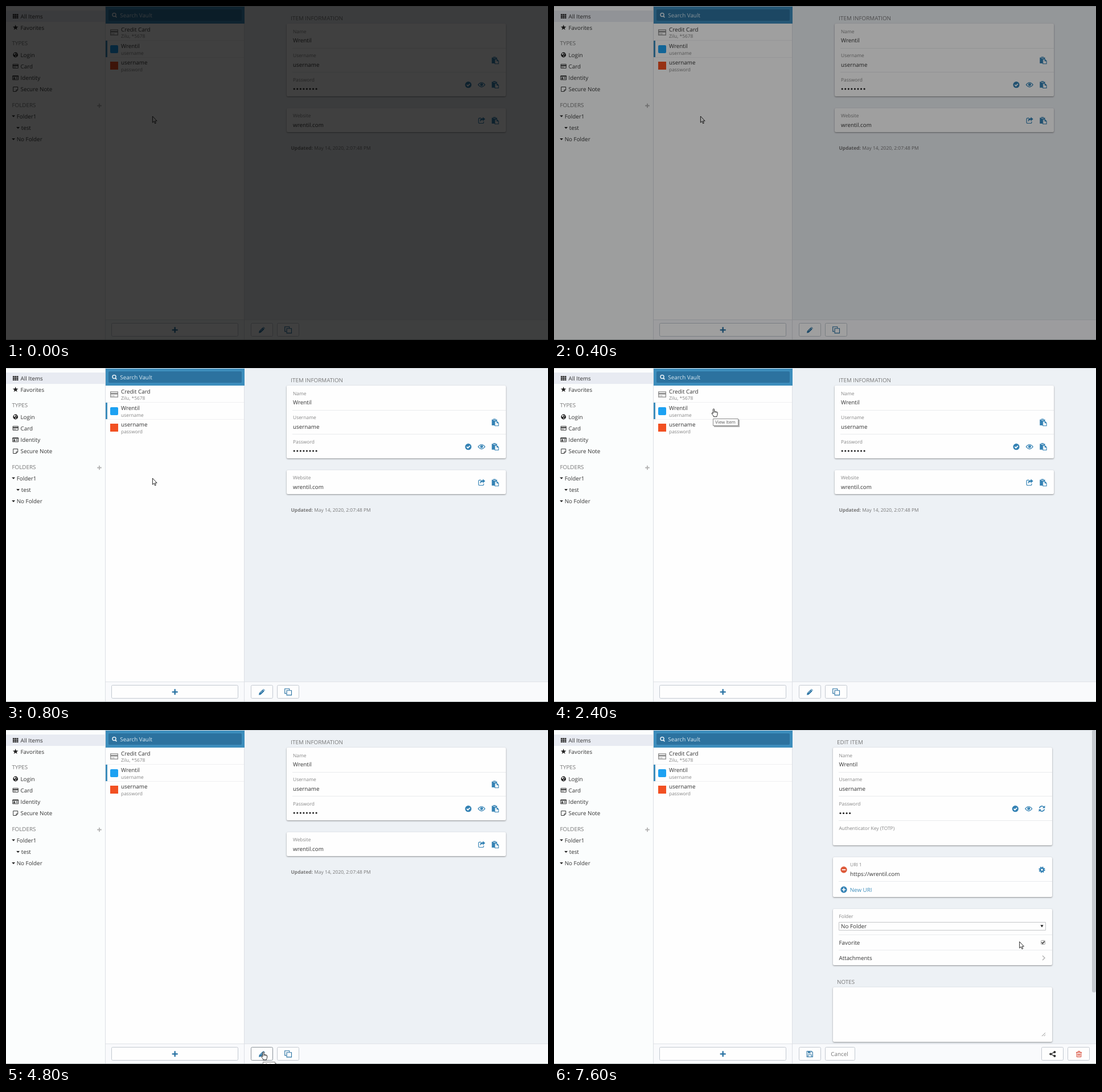
These frames come from a looping animation (952 px wide and 588 px high, 8 s). An HTML page with a canvas:

```html
<!DOCTYPE html>
<html lang="en">
<head>
<meta charset="utf-8">
<title>Vault</title>
<style>
html, body { margin: 0; width: 952px; height: 588px; overflow: hidden; background: #000; }
canvas { display: block; }
</style>
</head>
<body>
<canvas id="stage" width="952" height="588"></canvas>
<script>
const ctx = document.getElementById('stage').getContext('2d');
const LOOP = 8000, STEP = 200;
const BASE = 9.84, SMALL = 8.44;
const BLUE = '#3c8dbc', ICON = '#3482b4', DEEP = '#2872a3', INK = '#333', MUTED = '#777', LABEL = '#858585';
const WHITE = '#fefefe', LINE = '#e9ebed';
const SITE = 'Wrentil', HOST = 'wrentil.com';

// ---------- helpers ----------
function rect(x, y, w, h, color) {
  ctx.fillStyle = color;
  ctx.fillRect(x, y, w, h);
}

function box(x, y, w, h, r, fill, stroke) {
  ctx.beginPath();
  ctx.roundRect(x, y, w, h, r);
  if (fill) { ctx.fillStyle = fill; ctx.fill(); }
  if (stroke) { ctx.strokeStyle = stroke; ctx.lineWidth = 1; ctx.stroke(); }
}

// y is the middle of the capitals
function text(s, x, y, size = BASE, color = INK, weight = 400) {
  ctx.font = `${weight} ${size}px "Open Sans", sans-serif`;
  ctx.fillStyle = color;
  ctx.fillText(s, x, y + size * 0.357);
  return ctx.measureText(s).width;
}

function at(x, y, draw) {
  ctx.save();
  ctx.translate(x, y);
  draw();
  ctx.restore();
}

function fill(d, color) {
  ctx.fillStyle = color;
  ctx.fill(new Path2D(d), 'evenodd');
}

function line(d, color, width = 1) {
  ctx.strokeStyle = color;
  ctx.lineWidth = width;
  ctx.stroke(new Path2D(d));
}

function disc(x, y, r, color) {
  ctx.beginPath();
  ctx.arc(x, y, r, 0, 7);
  ctx.fillStyle = color;
  ctx.fill();
}

function card(y, h, x, rows) {
  ctx.save();
  ctx.shadowColor = 'rgba(0,0,0,.42)';
  ctx.shadowBlur = 2.5;
  ctx.shadowOffsetY = 1;
  box(x, y, 385, h, 2, WHITE);
  ctx.restore();
  for (const r of rows) rect(x + 10, r, 375, 1, LINE);
}

function button(x, w, hot) {
  box(x + 0.5, 558.5, w - 1, 23, 2, WHITE, hot ? '#8b9299' : '#c3c9d1');
}

function dots(x, y, n) {
  for (let i = 0; i < n; i++) disc(x + i * 5.56, y, 1.6, '#222');
}

// ---------- icons, centred on the origin ----------
const icons = {
  grid() {
    for (let i = 0; i < 9; i++) rect(-4.8 + (i % 3) * 3.4, -3.9 + Math.floor(i / 3) * 2.8, 2.8, 2.2, '#222');
  },
  star() {
    ctx.beginPath();
    for (let i = 0; i < 10; i++) {
      const a = -Math.PI / 2 + i * Math.PI / 5, r = i % 2 ? 2.1 : 5;
      ctx.lineTo(r * Math.cos(a), r * Math.sin(a));
    }
    ctx.fillStyle = '#222';
    ctx.fill();
  },
  globe() {
    disc(0, 0, 4.4, '#222');
    fill('M-2.8-2.4L-.6-3.2 .4-1.8-.8-.8-1.2 .6-2.6-.4ZM1.2-2.6L2.8-1.4 2-.4.8-1ZM-.2 1L1.6 1.4.6 3.2-.4 2.6Z', WHITE);
  },
  creditCard(color = '#222', k = 1) {
    ctx.scale(k, k);
    line('M-4.6-3.4H4.6V3.4H-4.6Z', color, 0.9);
    rect(-4.6, -1.8, 9.2, 1.8, color);
    rect(-3.5, 1.5, 1.4, 0.7, color);
    rect(-1.6, 1.5, 2, 0.7, color);
  },
  idCard() {
    line('M-5-3.4H5V3.4H-5Z', '#222', 0.9);
    rect(-5, -3.8, 10, 1.6, '#222');
    disc(-2.2, -0.4, 1.1, '#222');
    rect(-3.8, 0.8, 3.2, 1.6, '#222');
    rect(0.6, -1, 3.2, 0.8, '#222');
    rect(0.6, 0.9, 3.2, 0.8, '#222');
  },
  note() { line('M-4-4H4V1.2L1.2 4H-4ZM4 1.2H1.2V4', '#222', 0.9); },
  caret() { fill('M-2.9-1.4H2.9L0 1.7Z', '#222'); },
  search() {
    line('M3-.6A3 3 0 1 1-3-.6 3 3 0 1 1 3-.6', '#e6f0f6', 1.5);
    line('M1.6 1.4L4.4 4.2', '#e6f0f6', 1.8);
  },
  plus(color = DEEP, r = 5, w = 2.3) { line(`M${-r} 0H${r}M0 ${-r}V${r}`, color, w); },
  pencil() {
    fill('M-5.2 5.2L-4.6 1.8 1.6-4.4 4.4-1.6-1.8 4.6ZM2.2-5L3-5.6 5.6-3 5-2.2Z', DEEP);
    line('M-2.4 1.8L1.8-2.4', WHITE, 0.7);
  },
  clone() {
    line('M2-3.2V-5.5H-6V2.6H-3.2', DEEP, 1.1);
    line('M-2.6-2.6H5.8V5.6H-2.6Z', DEEP, 1.1);
  },
  paste() {
    fill('M-6-5.2H-3.6V-6.4H.8V-5.2H3.2V5H-6Z', ICON);
    rect(-3.4, -4.8, 4, 0.9, WHITE);
    fill('M-1.2-2.6H3.4L6.4.4V6.4H-1.2Z', WHITE);
    line('M-.6-2H3L5.8.8V5.8H-.6ZM3-2V.8H5.8', ICON, 1.1);
  },
  check() {
    disc(0, 0, 5.6, ICON);
    line('M-2.7 0L-.7 2 2.8-1.6', WHITE, 1.7);
  },
  eye() {
    line('M-6 0Q0-7.8 6 0Q0 7.8-6 0Z', ICON, 1.1);
    disc(0, -0.5, 2.5, ICON);
    line('M-1.3-.6Q-1.2-1.8 0-1.9', WHITE, 0.6);
  },
  share() {
    line('M-.8-4.2H-3.6Q-5.2-4.2-5.2-2.6V3.4Q-5.2 5-3.6 5H2Q3.6 5 3.6 3.4V2', ICON, 1.2);
    fill('M2.2-6L6.4-2.4 2.2 1.2V-.9Q-1.6-1-1.8 2.6Q-4.4-3.6 2.2-3.9Z', ICON);
  },
  refresh() {
    line('M-4.4-1A4.5 4.5 0 0 1 3.4-2.9M4.4 1A4.5 4.5 0 0 1-3.4 2.9', ICON, 1.7);
    fill('M5.4-5.4V-.9H.9ZM-5.4 5.4V.9H-.9Z', ICON);
  },
  round(color, plus) {
    disc(0, 0, 5.7, color);
    line(plus ? 'M-3.2 0H3.2M0-3.2V3.2' : 'M-3.2 0H3.2', WHITE, 1.7);
  },
  cog() {
    line('M3 0A3 3 0 1 1-3 0A3 3 0 1 1 3 0', ICON, 2.5);
    ctx.setLineDash([1.9, 1.71]);
    line('M4.6 0A4.6 4.6 0 1 1-4.6 0A4.6 4.6 0 1 1 4.6 0', ICON, 2);
  },
  save() {
    line('M-5-5H3L5-3V5H-5Z', DEEP, 1.1);
    rect(-3, -5, 5, 3.8, DEEP);
    rect(0, -4.4, 1.2, 2.4, WHITE);
    line('M-3 5V1.2H3V5', DEEP, 1);
  },
  nodes() {
    line('M3.6-3.4L-3.4 0 3.6 3.4', INK, 1.3);
    for (const [x, y] of [[3.6, -3.4], [-3.4, 0], [3.6, 3.4]]) disc(x, y, 2.1, INK);
  },
  trash() {
    line('M-5-3H5M-2-3L-1.4-5H1.4L2-3M-3.8-3V5H3.8V-3M-1.7-1V3.2M0-1V3.2M1.7-1V3.2', '#d6432f', 1);
  }
};

function icon(name, x, y, ...args) {
  at(x, y, () => icons[name](...args));
}

// ---------- panes ----------
function sidebar() {
  rect(0, 0, 174, 588, '#fbfdfd');
  rect(0, 8, 174, 20, '#e8ebf2');
  const nav = [['grid', 'All Items', 18], ['star', 'Favorites', 38], ['globe', 'Login', 86],
    ['creditCard', 'Card', 106], ['idCard', 'Identity', 126.5], ['note', 'Secure Note', 146.5]];
  for (const [name, label, y] of nav) {
    icon(name, 16.7, y);
    text(label, 25.5, y);
  }
  text('TYPES', 10.5, 65.5, BASE, MUTED);
  text('FOLDERS', 10.5, 174, BASE, MUTED);
  icon('plus', 164, 175.5, '#b4b4b4', 3.8, 1.8);
  for (const [label, x, y] of [['Folder1', 18.7, 194], ['test', 26.7, 214.5], ['No Folder', 18.7, 234.5]]) {
    icon('caret', x - 5.6, y);
    text(label, x, y);
  }
  rect(174, 0, 1, 588, '#dcdfe4');
}

function list() {
  rect(175, 0, 243, 588, WHITE);
  rect(175, 1, 244, 30, BLUE);
  box(180, 6, 234, 20, 2, '#2c729f');
  icon('search', 190, 16);
  text('Search Vault', 200.3, 16, BASE, '#dceaf2');

  const rows = [['Credit Card', 'Zilu, *5678'], [SITE, 'username'], ['username', 'password']];
  rows.forEach(([title, sub], i) => {
    const y = 41 + i * 29.3;
    text(title, 202, y);
    text(sub, 202, y + 12.2, SMALL, LABEL);
  });
  rect(175, 60, 243, 1, '#f0f0f2');
  rect(175, 90, 243, 1, '#f0f0f2');
  rect(175, 61, 3, 29, BLUE);
  icon('creditCard', 190, 46.5, '#888', 1.38);
  box(183, 69, 14, 14, 2, '#1da1f2');
  rect(183, 98, 14, 14, '#f25022');

  rect(175, 552, 243, 36, '#f9fafc');
  rect(175, 552, 243, 1, '#e0e3e8');
  button(185, 223);
  icon('plus', 296.7, 570.3);
  rect(418, 31, 1, 557, '#dcdfe4');
}

function mainFooter() {
  rect(419, 552, 533, 36, '#f9fafc');
  rect(419, 552, 533, 1, '#e0e3e8');
}

function viewPane(hot) {
  text('ITEM INFORMATION', 500.3, 21.5, BASE, MUTED);
  card(31, 128, 493, [74, 116]);
  card(180, 42, 493, []);
  const fields = [['Name', SITE, 44.5], ['Username', 'username', 87], ['Password', '', 129.7], ['Website', HOST, 193.3]];
  for (const [label, value, y] of fields) {
    text(label, 504, y, SMALL, LABEL);
    text(value, 504, y + 16.3);
  }
  dots(506.2, 146, 8);
  for (const y of [96, 138.7, 202]) icon('paste', 859.3, y);
  icon('check', 812, 138.7);
  icon('eye', 835.3, 138.7);
  icon('share', 835.3, 201.5);
  const w = text('Updated: ', 500.5, 250, SMALL, MUTED, 700);
  text('May 14, 2020, 2:07:48 PM', 500.5 + w, 250, SMALL, MUTED);

  mainFooter();
  button(430, 39, hot);
  icon('pencil', 449.3, 570.5);
  button(476, 39);
  icon('clone', 495.7, 570.3);
}

function editPane(hot, checked) {
  const x = 500.5;
  text('EDIT ITEM', 497, 21.5, BASE, MUTED);
  card(31, 172, 490, [74, 116, 159]);
  const fields = [['Name', SITE, 44.5], ['Username', 'username', 87], ['Password', '', 129.7], ['Authenticator Key (TOTP)', '', 173]];
  for (const [label, value, y] of fields) {
    text(label, x, y, SMALL, LABEL);
    text(value, x, y + 16.3);
  }
  dots(503, 146.5, 4);
  icon('check', 810.3, 138.7);
  icon('eye', 833.7, 138.7);
  icon('refresh', 857, 138.5);

  card(224, 70, 490, [266]);
  icon('round', 509, 246, '#dd5a3a', false);
  text('URI 1', 520, 237.3, SMALL, LABEL);
  text('https://' + HOST, 520, 253.5);
  icon('cog', 857, 246);
  icon('round', 509, 281, ICON, true);
  text('New URI', 519.7, 281, BASE, BLUE);

  card(315, 99, 490, [360, 387]);
  text('Folder', x, 328, SMALL, LABEL);
  box(500.5, 338.5, 363, 14, 0, WHITE, '#c4c6c8');
  text('No Folder', 504, 345.7);
  at(857, 345.2, () => fill('M-2.6-2H2.6L0 2.4Z', '#222'));
  text('Favorite', x, 374.3);
  box(855.5, 370.5, 7, 7, 1, '#f2f2f2', '#a3a3a3');
  if (checked) at(859, 374, () => line('M-2.4 0L-.7 1.9 2.5-2', '#333', 1.5));
  text('Attachments', x, 401.5);
  at(860, 401.3, () => line('M-2-4L2 0-2 4', '#b5b5b5', 1.5));

  text('NOTES', 497, 443, BASE, MUTED);
  card(453, 96, 490, []);
  at(860, 536, () => line('M-3 3L3-3M.4 3L3 .4', '#777', 0.8));
  box(945, 0, 7, 462, 3, '#c6cacf');

  mainFooter();
  button(430, 39, hot);
  icon('save', 449.3, 570.5);
  button(476, 53);
  text('Cancel', 486.3, 570.3, BASE, MUTED);
  button(856, 39);
  icon('nodes', 875.7, 570.5);
  button(902, 39);
  icon('trash', 922, 570.5);
}

// ---------- pointer ----------
// [first step time, steps, x, y]
const moves = [[1400, 5, 280.5, 71.5], [3200, 6, 452, 566.5], [5600, 6, 758, 358], [6800, 2, 817.3, 372.7]];

function pointerAt(t) {
  let x = 257, y = 194;
  for (const [start, n, tx, ty] of moves) {
    const p = Math.max(0, Math.min(1, ((t - start) / STEP + 1) / n));
    const e = p * p * (3 - 2 * p);
    x += (tx - x) * e;
    y += (ty - y) * e;
  }
  return { x, y };
}

function pointer({ x, y }, hand) {
  const shape = hand
    ? 'M-1.1 1Q0-.6 1.1 1V5Q2.2 4.2 3 5.2Q4.1 4.6 4.8 5.8Q6.2 5.3 6.6 6.9V10Q6.4 12 5.5 13V14.3H-.3V13Q-2 11-3.3 8.6Q-3.3 7.1-2 7.4L-1.1 8.5Z'
    : 'M.4 0V11.2L2.9 8.9 4.7 12.9 6.4 12.1 4.7 8.3H8.1Z';
  at(x, y, () => {
    ctx.lineJoin = 'round';
    fill(shape, '#fff');
    line(shape, '#111', 0.9);
    if (hand) line('M1.1 5V7.4M3 5.4V7.4M4.8 6V7.6', '#111', 0.7);
  });
}

function tooltip(s, x, y, w) {
  rect(x + 2, y + 2, w, 13, 'rgba(0,0,0,.3)');
  box(x + 0.5, y + 0.5, w - 1, 12, 0, '#fff', '#8a8a8a');
  text(s, x + 4, y + 6.4, 7.9, '#5a5a5a');
}

function draw(t) {
  const p = pointerAt(t);
  const onButton = p.x > 430 && p.x < 469 && p.y > 558 && p.y < 582;
  const onList = p.x > 175 && p.x < 418 && p.y > 31 && p.y < 119;

  rect(0, 0, 952, 588, '#edf1f5');
  sidebar();
  list();
  if (t < 5000) viewPane(onButton);
  else editPane(onButton, t >= 7600);
  rect(0, 0, 952, 1, 'rgba(120,130,140,.3)');
  rect(0, 587, 952, 1, '#aeb6b6');

  if (t >= 2400 && t < 3200) tooltip('View Item', 279, 89, 45);
  if (t === 4800) tooltip('Edit', 451, 584, 22);
  pointer(p, onButton || onList);

  const light = Math.min(1, 0.25 + 0.1875 * t / STEP);
  if (light < 1) rect(0, 0, 952, 588, `rgba(0,0,0,${1 - light})`);
}

ctx.textRendering = 'geometricPrecision';

function frame() {
  draw(Math.floor(performance.now() % LOOP / STEP) * STEP);
  requestAnimationFrame(frame);
}
frame();
</script>
</body>
</html>
```
